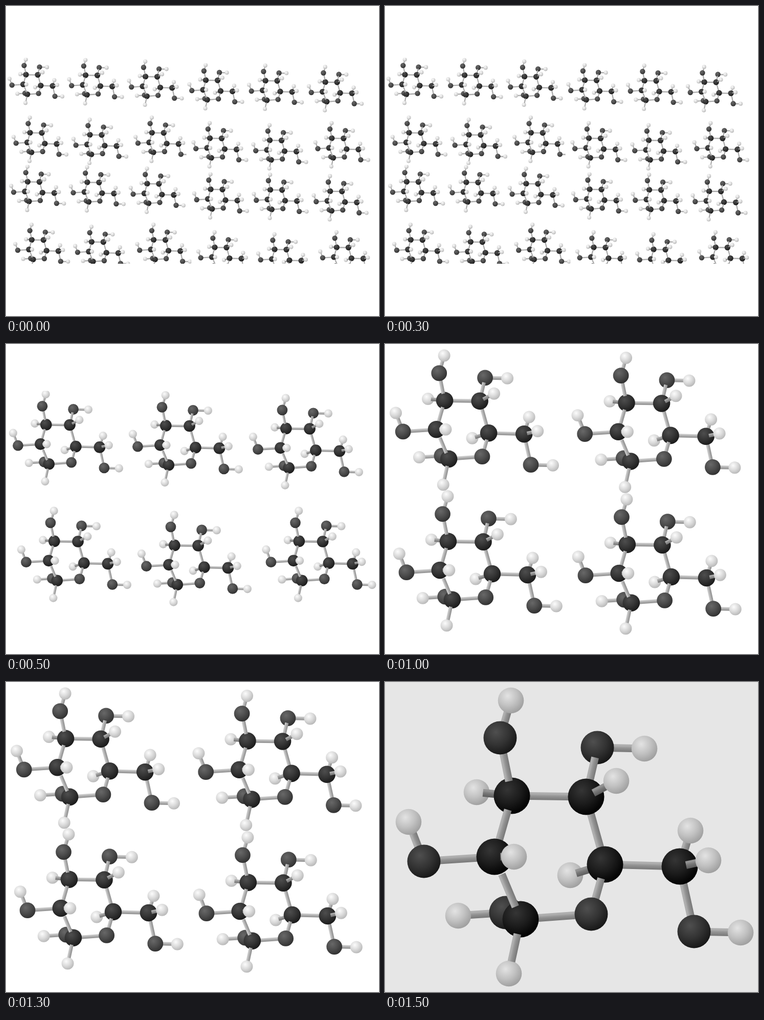
An HTML page with a canvas for the animation above (2 s loop, 729 px wide and 605 px high).

```html
<!DOCTYPE html>
<html lang="en">
<head>
<meta charset="utf-8">
<title>Molecules</title>
<style>
  html, body { margin: 0; width: 100%; height: 100%; overflow: hidden; background: #fff; }
  canvas { display: block; }
</style>
</head>
<body>
<canvas id="stage" width="729" height="605"></canvas>
<script>
const ctx = document.getElementById("stage").getContext("2d");
const W = 729, H = 605, STEP = 500;

// Atom centres at full size; the first letter of a key is the element.
const atoms = {
  c1: [248, 222], c2: [393, 224], c3: [430, 356], c4: [576, 360], c5: [265, 463], c6: [214, 341],
  o1: [225, 109], o2: [415, 128], o4: [604, 487], o5: [403, 453], o6: [236, 450], o7: [76, 350],
  h1: [246, 36], h2: [179, 215], h3: [507, 130], h4: [452, 193], h5: [362, 377], h6: [597, 290],
  h7: [632, 348], h8: [695, 489], h9: [143, 456], h10: [242, 569], h11: [252, 341], h12: [46, 273]
};

// Radius and grey level of each element; spread is the contrast of its shading.
const elements = {
  c: { r: 35.5, level: 52, spread: 26 },
  o: { r: 32.5, level: 76, spread: 28 },
  h: { r: 25.3, level: 218, spread: 34 }
};

// Back to front: atoms, and bonds as from-to:start:end (fractions of the bond).
const order = `
  h1-o1 c1-c2 c2-c3 o2-h3 c3-c4 c4-h6 c4-o4 o4-h8 c5-o5 o6-h9 c6-o7 o7-h12
  h2 h5 o2 h2-c1:.18 h5-c3:.17 o2-c2:.2
  h1 c1 c1-o1:.25 o1 c1-c6:.23 h3 c2 c3 c3-o5:.28 h6 c4 o4 h8 o5 o6 h9 h10 c6 o7 h12 c5
  c6-c5:.28:.8 c5-h10:.27:.78 c2-h4:.24 h4 c4-h7:.22 h7 c6-h11:.3 h11
`.trim().split(/\s+/);

let dim = 0;
const grey = v => {
  const n = Math.max(0, Math.min(255, Math.round(v - dim)));
  return `rgb(${n},${n},${n})`;
};

// Lit side, body and shaded side around one grey level.
function shade(gradient, level, spread, stops) {
  [spread, 0, -spread].forEach((d, i) => gradient.addColorStop(stops[i], grey(level + d)));
  return gradient;
}

function drawAtom(key) {
  const [x, y] = atoms[key], { r, level, spread } = elements[key[0]];
  const lx = x - r * .25, ly = y - r * .35;
  const g = ctx.createRadialGradient(lx, ly, 0, lx, ly, r * 1.4);
  ctx.fillStyle = shade(g, level, spread, [0, .55, 1]);
  ctx.beginPath();
  ctx.arc(x, y, r, 0, Math.PI * 2);
  ctx.fill();
}

function drawBond(token) {
  const [pair, start = 0, end = 1] = token.split(":");
  const [a, b] = pair.split("-").map(k => atoms[k]);
  const dx = b[0] - a[0], dy = b[1] - a[1], len = Math.hypot(dx, dy);
  const half = 7.5, lit = dx > dy ? -half : half;
  ctx.save();
  ctx.translate(...a);
  ctx.rotate(Math.atan2(dy, dx));
  // Short bonds point at the viewer and get less light.
  const g = ctx.createLinearGradient(0, lit, 0, -lit);
  ctx.fillStyle = shade(g, len < 72 ? 145 : 172, 28, [.2, .5, 1]);
  ctx.fillRect(len * start, -half, len * (end - start), half * 2);
  ctx.restore();
}

// Draws a part at a place and scale; the origin of a part is its first c1 atom.
function place([x, y], scale, part) {
  ctx.save();
  ctx.translate(x, y);
  ctx.scale(scale, scale);
  part();
  ctx.restore();
}

function molecule() {
  ctx.translate(-atoms.c1[0], -atoms.c1[1]);
  for (const token of order) (token.includes("-") ? drawBond : drawAtom)(token);
}

// Six molecules on their own cropped white sheet.
const six = [[0, 0], [234, 2], [469, 7.5], [16, 227.5], [251, 235.5], [494.5, 227.5]];
function sheet() {
  ctx.beginPath();
  ctx.rect(-76, -66, 723, 430);
  ctx.clip();
  ctx.fillStyle = "#fff";
  ctx.fill();
  for (const at of six) place(at, .319, molecule);
}

const steps = [
  { part: sheet, scale: .498, at: [[39, 134], [390.5, 144.7], [42.3, 343], [400, 357.7]], bottom: 503 },
  { part: sheet, scale: 1, at: [[78.3, 157.4]] },
  { part: molecule, scale: .473, at: [[116.6, 110.4], [472, 115], [123.4, 385.2], [473.3, 391.2]] },
  { part: molecule, scale: 1, at: [atoms.c1], dim: 25 }
];

function render(step) {
  dim = step.dim || 0;
  ctx.fillStyle = grey(255);
  ctx.fillRect(0, 0, W, H);
  ctx.save();
  ctx.beginPath();
  ctx.rect(0, 0, W, step.bottom || H);
  ctx.clip();
  for (const at of step.at) place(at, step.scale, step.part);
  ctx.restore();
}

let shown = -1;
const begin = performance.now();
function tick() {
  const i = Math.floor((performance.now() - begin) / STEP) % steps.length;
  if (i !== shown) render(steps[shown = i]);
  requestAnimationFrame(tick);
}
tick();
</script>
</body>
</html>
```
